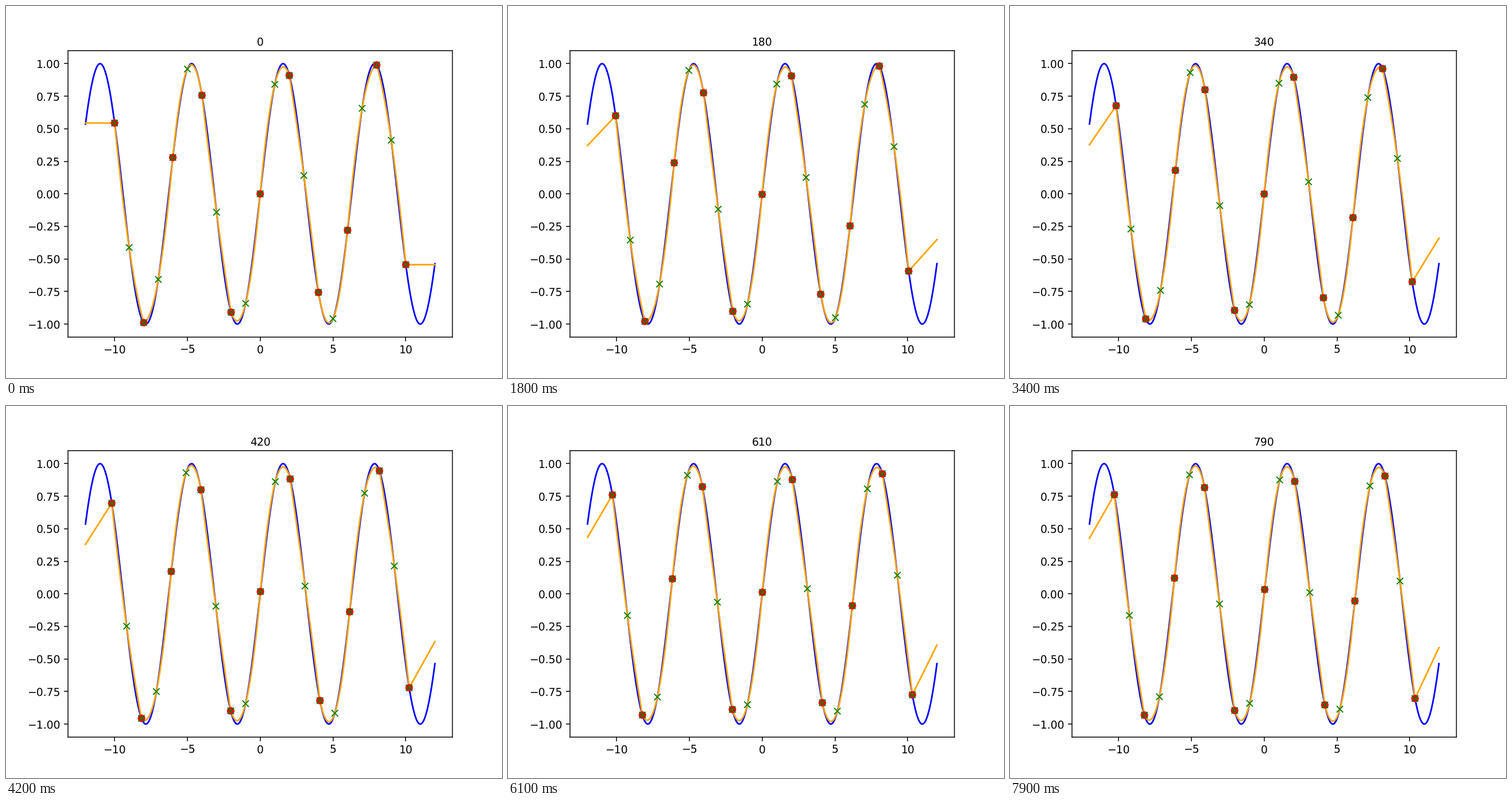
These frames come from a looping animation (864 px wide and 648 px high, 8 s). A matplotlib script:

```python
import numpy as np
import matplotlib.pyplot as plt
from matplotlib.animation import FuncAnimation

plt.rcParams.update({"path.snap": False, "text.hinting": "none"})

FRAMES, INTERVAL = 80, 100
DRIFT = [(0, 0), (12, 0.005), (27, -0.0175), (46, 0.027), (61, 0.012),
         (79, 0.0335)]

xs = np.linspace(-12, 12, 1201)
grid = np.arange(-10, 11)


def settle(k, end, tau):
    return end * (1 - np.exp(-k / tau))


def nodes_at(k):
    """Integer grid that waits, then stretches with an ease-out and drifts."""
    u = np.clip((k - 9) / 62, 0, 1)
    stretch = 1 + 0.0325 * (1 - (1 - u) ** 1.4)
    return np.interp(k, *zip(*DRIFT)) + stretch * grid


def approx(x, nodes, left, right):
    """Piecewise parabolas through node triples, straight lines outside."""
    vals = np.sin(nodes)
    step = nodes[1] - nodes[0]
    mid = 2 * np.clip(((x - nodes[0]) // (2 * step)).astype(int), 0, 9) + 1
    u = (x - nodes[mid]) / step
    a, b, c = vals[mid - 1], vals[mid], vals[mid + 1]
    y = b + (c - a) / 2 * u + (a - 2 * b + c) / 2 * u**2
    y = np.where(x < nodes[0], vals[0] + left * (x - nodes[0]), y)
    return np.where(x > nodes[-1], vals[-1] + right * (x - nodes[-1]), y)


def dots(points, marker, color):
    # One size per point keeps the markers at sub-pixel positions
    return ax.scatter(points, np.sin(points), s=np.full(len(points), 36),
                      marker=marker, color=color, linewidths=1, zorder=3)


def move(marks, points):
    marks.set_offsets(np.column_stack([points, np.sin(points)]))


fig, ax = plt.subplots(figsize=(6.4, 4.8), dpi=135)
ax.plot(xs, np.sin(xs), color="blue")
curve, = ax.plot([], [], color="orange")
knots = dots(grid[::2], "o", "red")
crosses = dots(grid, "x", "green")
label = ax.text(0.5, 1.01, "", ha="center", va="bottom",
                transform=ax.transAxes)
ax.set_xlim(-13.2, 13.2)
ax.set_ylim(-1.1, 1.1)


def update(k):
    nodes = nodes_at(k)
    x = np.sort(np.concatenate([xs, nodes]))
    curve.set_data(x, approx(x, nodes, settle(k, 0.2, 20),
                             settle(k, 0.25, 26)))
    move(knots, nodes[::2])
    move(crosses, nodes)
    label.set_text(str(10 * k))
    return curve, knots, crosses, label


anim = FuncAnimation(fig, update, frames=FRAMES, interval=INTERVAL,
                     repeat=True, repeat_delay=0)
plt.show()
```
